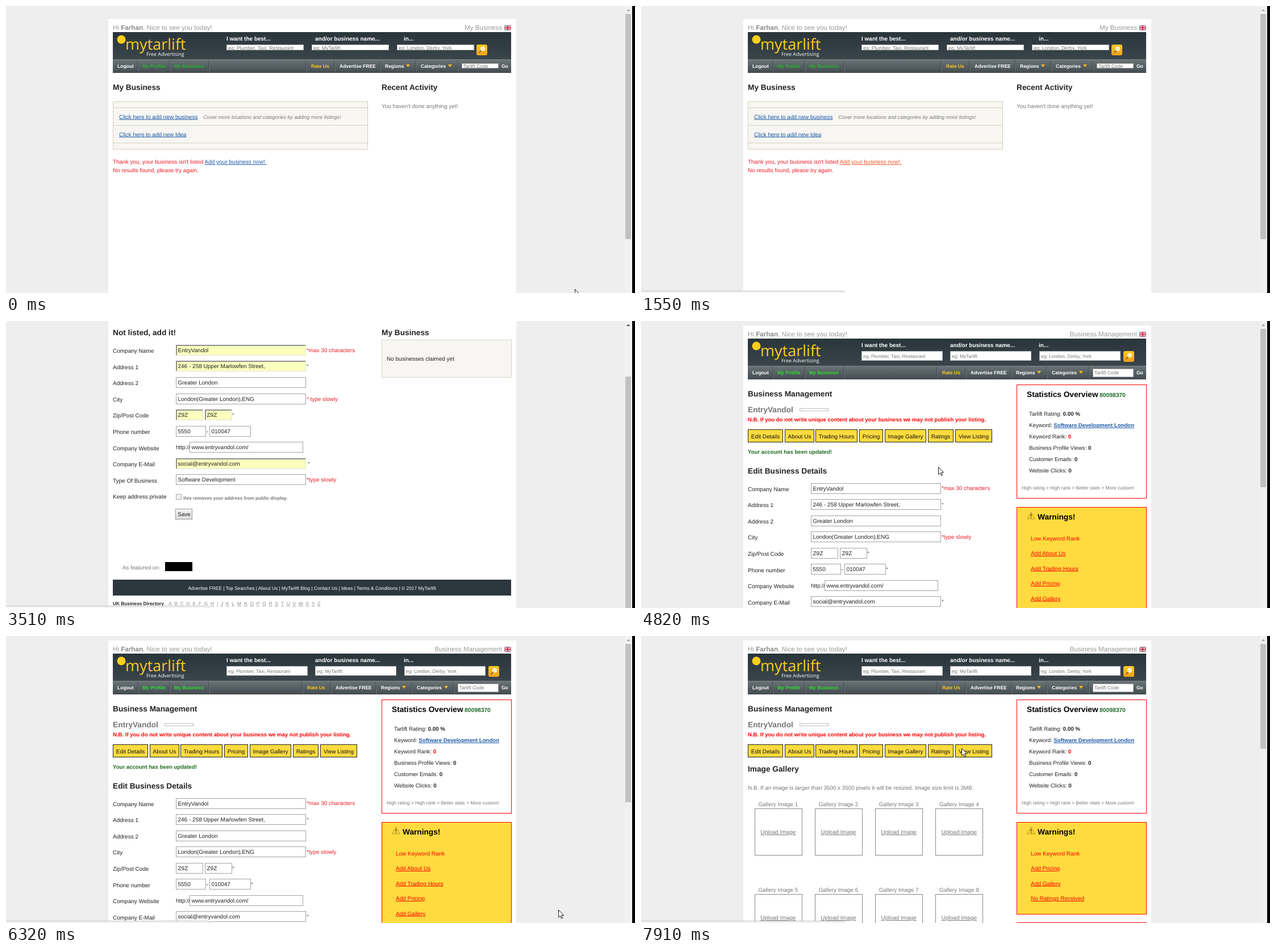
Write an HTML page that moves like this. It is 1107x506 px and loops after 8 s.

```html
<!DOCTYPE html>
<html lang="en">
<head>
<meta charset="utf-8">
<title>Business listing</title>
<style>
  html, body { margin: 0; width: 100%; height: 100%; overflow: hidden; background: #eee; }
  svg { display: block; width: 1107px; height: 506px; }
  text { font-family: "Liberation Sans", Arial, sans-serif; text-rendering: geometricPrecision; white-space: pre; }
  .logo { font-family: "Open Sans", "Noto Sans", sans-serif; }
  .b { font-weight: bold; }
  .i { font-style: italic; }
  .u { text-decoration: underline; }
  .mid { text-anchor: middle; }
</style>
</head>
<body>
<svg id="stage" viewBox="0 0 1107 506" xmlns="http://www.w3.org/2000/svg"></svg>
<script>
const LOOP = 8000;
const DARK = '#222', GREY = '#777', BLUE = '#1d5aa8', RED = '#ee1c25', ALERT = '#f00', GOLD = '#ffdb3f';
const BRAND = 'MyTarlift', COMPANY = 'EntryVandol';

// cy is the middle of the capital letters
const text = (x, cy, size, content, fill = DARK, cls = '') =>
  `<text x="${x}" y="${cy + size * .36}" font-size="${size}" fill="${fill}" class="${cls}">${content}</text>`;
const rect = (x, y, w, h, fill, extra = '') =>
  `<rect x="${x}" y="${y}" width="${w}" height="${h}" fill="${fill}" ${extra}/>`;
const box = (x, y, w, h, fill, stroke, extra = '') =>
  rect(x + .5, y + .5, w - 1, h - 1, fill, `stroke="${stroke}" ${extra}`);
const path = (d, fill, extra = '') => `<path d="${d}" fill="${fill}" ${extra}/>`;
const bold = (s, fill = DARK) => `<tspan class="b" fill="${fill}">${s}</tspan>`;
const heading = (x, cy, s, fill = DARK) => text(x, cy, 13.7, s, fill, 'b');

const gradient = (id, top, bottom) =>
  `<linearGradient id="${id}" x2="0" y2="1"><stop stop-color="${top}"/><stop offset="1" stop-color="${bottom}"/></linearGradient>`;
const defs = `<defs>${gradient('banner', '#2a353b', '#3a454b')}${gradient('nav', '#6b7477', '#424b4f')}` +
  `${gradient('find', '#fbc926', '#f0a01c')}${gradient('button', '#f5f5f5', '#dcdcdc')}</defs>`;

function flag(x, y) {
  return rect(x, y, 12, 9, '#2b3f86') +
    path(`M${x} ${y}l12 9m0-9l-12 9`, 'none', 'stroke="#fff" stroke-width="2"') +
    path(`M${x} ${y}l12 9m0-9l-12 9`, 'none', 'stroke="#d3283c" stroke-width=".7"') +
    path(`M${x + 6} ${y}v9m-6-4.5h12`, 'none', 'stroke="#fff" stroke-width="3.4"') +
    path(`M${x + 6} ${y}v9m-6-4.5h12`, 'none', 'stroke="#d3283c" stroke-width="2"');
}

// The top banner; the roomy version has taller search fields.
function header(title, roomy) {
  const fields = roomy ? [388, 544, 701] : [388, 538, 688];
  const [w, h, size] = roomy ? [143, 17, 8.35] : [136, 10, 8.8];
  const shift = roomy ? -7 : 0, green = roomy ? '#2be02b' : '#1fb52c';
  const hints = ['eg: Plumber, Taxi, Restaurant', 'eg: ' + BRAND, 'eg: London, Derby, York'];
  const bx = roomy ? 849 : 828;
  const codeY = roomy ? 99 : 101, codeH = roomy ? 15 : 9;
  let s = text(188, 38, 11.65, `Hi ${bold('Farhan', '#888')}, Nice to see you today!`, '#999') +
    `<g text-anchor="end">${text(873, 38, 11.65, title, '#999')}</g>` + flag(877, 34) +
    rect(188, 46, 701, 48, 'url(#banner)') + rect(188, 94, 701, 24, 'url(#nav)') +
    rect(188, 94, 701, 1, '#7d8588') +
    '<circle cx="203" cy="59" r="7.5" fill="#ffcf1a"/>' +
    text(210, 67.5, 27, BRAND.toLowerCase(), '#ffcf1a', 'logo') +
    text(247, 85, 8.9, 'Free Advertising', '#fff', 'logo');
  ['I want the best...', 'and/or business name...', 'in...'].forEach((label, i) =>
    s += text(388 + 156 * i, 57.5, 10, label, '#fff', 'b'));
  fields.forEach(x => s += box(x, 68, w, h, '#fff', '#b5b9bb'));
  s += '<g class="hint">' + hints.map((hint, i) =>
    text(fields[i] + 3, roomy ? 77 : 73.5, size, hint, GREY)).join('') + '</g>';
  s += rect(bx, 68, 19, 19, 'url(#find)', 'rx="3"') +
    `<circle cx="${bx + 11}" cy="75.5" r="3.6" fill="#fbe9b5" stroke="#fff"/>` +
    path(`M${bx + 8.5} 78.5l-4 4`, 'none', 'stroke="#8a6a3a" stroke-width="1.8"');
  [232, 288, 357].concat([528, 578, 658, 721, 795].map(x => x + shift)).forEach(x =>
    s += rect(x - .5, 95, 1, 23, '#3a4347') + rect(x + .5, 95, 1, 23, '#6c7578'));
  const item = (x, label, fill = '#fff') => text(x, 106, 8.5, label, fill, 'b');
  s += item(196, 'Logout') + item(240, 'My Profile', green) + item(296, 'My Business', green) +
    item(537 + shift, 'Rate Us', '#ffc91f') + item(587 + shift, 'Advertise FREE') +
    item(667 + shift, 'Regions') + item(730 + shift, 'Categories') + item(872, 'Go');
  [704, 778].forEach(x => s += path(`M${x + shift} 103h7l-3.5 5z`, '#f8b51e'));
  s += box(802 + shift, codeY, 65 - shift, codeH, '#fff', '#aaa') +
    text(805 + shift, 106, 8.6, 'Tarlift Code', GREY);
  return `<g transform="translate(0 ${roomy ? -15 : 0})">${s}</g>`;
}

function scrollbar(top, bottom, arrow = '#a3a3a3') {
  return rect(1089, 0, 13, 506, '#f1f1f1') + rect(1090, top, 10, bottom - top, '#c1c1c1') +
    path('M1092 9h6.5l-3.25-3.6z', arrow) + rect(1102, 0, 5, 506, '#000');
}
const sheet = top => rect(180, top, 718, 506 - top, '#fff');

function home() {
  let s = sheet(23) + header('My Business', false) + heading(188, 143, 'My Business') +
    heading(661, 143, 'Recent Activity') + text(661, 176, 9.9, "You haven't done anything yet!", GREY) +
    box(188, 168, 449, 85, '#f7f6f2', '#d5d1c0');
  [179, 210, 241].forEach(y => s += rect(188, y, 449, 1, '#d5d1c0'));
  return s + text(199, 195, 10, 'Click here to add new business', BLUE, 'u') +
    text(347.5, 195.5, 8.95, 'Cover more locations and categories by adding more listings!', GREY, 'i') +
    text(199, 226, 10, 'Click here to add new Idea', BLUE, 'u') +
    text(188, 274.5, 9.95, "Thank you, your business isn't listed", RED) +
    `<g id="link">${text(349.5, 274.5, 10, 'Add your business now!&#160;', 'currentColor', 'u')}</g>` +
    text(188, 289.5, 9.95, 'No results found, please try again.', RED) + scrollbar(14, 411);
}

// Listing form; unsaved required fields are yellow and sunken.
function form(y0, saved) {
  const rowY = i => y0 + 28.55 * i;
  const input = (i, x, w, value, required) => {
    const top = Math.round(rowY(i) - 10.4);
    const sunken = required && !saved;
    const frame = sunken
      ? rect(x, top, w, 19, '#e2e2da') + path(`M${x} ${top + 19}v-19h${w}l-2 2h${2 - w + 2}v15z`, '#8f8f8f') +
        rect(x + 2, top + 2, w - 3, 16, '#faffbd')
      : box(x, top, w, 19, '#fff', '#a3a3a3');
    return frame + text(x + 3.5, rowY(i) - 1, 10, value, DARK);
  };
  const note = (i, x, s, fill = RED) => text(x, rowY(i) - 1, 9.9, s, fill);
  const star = (i, x) => note(i, x, '*', '#664');
  const labels = ['Company Name', 'Address 1', 'Address 2', 'City', 'Zip/Post Code', 'Phone number',
    'Company Website', 'Company E-Mail', 'Type Of Business', 'Keep address private'];
  let s = labels.map((label, i) => text(188, rowY(i) + .3, 10, label)).join('') +
    input(0, 299, 229, COMPANY, true) + note(0, 529, '*max 30 characters') +
    input(1, 299, 229, '246 - 258 Upper Marlowfen Street,', true) + star(1, 529) +
    input(2, 299, 229, 'Greater London') +
    input(3, 299, 229, 'London(Greater London),ENG') + note(3, 529, saved ? '*type slowly' : '* type slowly') +
    input(4, 299, 48, 'Z9Z', true) + input(4, 350, 48, 'Z9Z', true) + star(4, 398) +
    input(5, 299, 53, '5550') + note(5, 352.5, '-', DARK) + input(5, 358, 73, '010047') +
    note(6, 299, 'http://', DARK) + input(6, 323, 200, 'www.entryvandol.com/') +
    input(7, 299, 229, 'social@entryvandol.com', true) + star(7, saved ? 529 : 531) +
    input(8, 299, 229, 'Software Development') + note(8, 529, '*type slowly');
  if (saved) s += star(5, 431);
  return s;
}

function addListing() {
  const letters = [...'ABCDEFGHIJKLMNOPQRSTUVWXYZ']
    .map((c, i) => `<tspan class="u" dx="${i ? 4.84 : 0}">${c}</tspan>`).join('');
  const footer = ['Advertise FREE', 'Top Searches', 'About Us', BRAND + ' Blog', 'Contact Us', 'Ideas',
    'Terms &amp; Conditions', '© 2017 ' + BRAND].join(' | ');
  return sheet(0) + heading(188, 20, 'Not listed, add it!') + heading(661, 20, 'My Business') +
    box(661, 33, 229, 67, '#f7f6f2', '#d8d5c8') + text(670, 66.3, 10, 'No businesses claimed yet') +
    form(52.3, false) + box(299, 305, 10, 10, '#f2f2f2', '#a0a0a0', 'rx="1.5"') +
    text(312, 312.3, 8.2, 'this removes your address from public display.', GREY, 'b') +
    box(298, 331, 30, 19, 'url(#button)', '#999') + text(302, 340, 10, 'Save') +
    text(205, 434, 9.8, 'As featured on:', GREY) + rect(280, 425, 48, 16, '#000') +
    rect(188, 456, 701, 28, '#2d383e') + text(538.5, 470.5, 8.35, footer, '#fff', 'mid') +
    text(188, 498.3, 8.3, 'UK Business Directory', DARK, 'b') + text(286, 498.3, 8.3, letters, '#888') +
    scrollbar(98, 506, '#505050');
}

function sidebar(tasks, closed) {
  const stats = ['Tarlift Rating: ' + bold('0.00 %'),
    'Keyword: ' + `<tspan class="b u" fill="${BLUE}" font-size="9.65">Software Development London</tspan>`,
    'Keyword Rank: ' + bold('0', ALERT), 'Business Profile Views: ' + bold('0'),
    'Customer Emails: ' + bold('0'), 'Website Clicks: ' + bold('0')];
  return box(661, 112, 229, 201, '#fff', ALERT) + heading(679, 129, 'Statistics Overview', '#000') +
    text(807, 130, 10.3, '80098370', '#1d6b2a', 'b') +
    stats.map((s, i) => text(683, 163.5 + 20 * i, 9.75, s)).join('') +
    text(670, 294, 8.4, 'High rating &gt; High rank &gt; Better stats &gt; More custom!', GREY) +
    box(661, 328, 229, closed ? 163 : 190, GOLD, ALERT) +
    (closed ? box(661, 505, 229, 20, '#fff', ALERT) : '') +
    path('M686.5 336.5l7 12.5h-14z', '#fbd12e', 'stroke="#b59a35" stroke-linejoin="round"') +
    path('M686.5 340v4.5m0 1.3v1.5', 'none', 'stroke="#333" stroke-width="1.3"') +
    heading(698, 345, 'Warnings!', '#000') + text(686, 383, 10, 'Low Keyword Rank', ALERT) +
    tasks.map((s, i) => text(686, 409.5 + 26.5 * i, 10, s, ALERT, 'u')).join('');
}

function manage(body, tasks, thumbEnd, closed) {
  const tabs = [[188, 62, 'Edit Details'], [253, 52, 'About Us'], [307, 74, 'Trading Hours'], [384, 42, 'Pricing'],
    [429, 73, 'Image Gallery'], [505, 45, 'Ratings'], [553, 65, 'View Listing']];
  return sheet(8) + header('Business Management', true) + heading(188, 128, 'Business Management') +
    heading(188, 156, COMPANY, GREY) + box(279, 154, 51, 5, '#fff', '#bbb') +
    text(188, 174, 9.55, 'N.B. If you do not write unique content about your business we may not publish your listing.', ALERT, 'b') +
    tabs.map(([x, w, s]) => box(x, 191, w, 23, GOLD, '#222') + text(x + w / 2, 203, 9.95, s, '#111', 'mid')).join('') +
    body + sidebar(tasks, closed) + scrollbar(14, thumbEnd);
}

function gallery() {
  let s = heading(188, 234, 'Image Gallery') +
    text(188, 267, 9.9, 'N.B. If an image is larger than 3500 x 3500 pixels it will be resized. Image size limit is 3MB.', GREY);
  for (let i = 0; i < 8; i++) {
    const cx = 241.3 + 106.2 * (i % 4), y = i < 4 ? 296.5 : 447.5;
    s += text(cx, y, 9.9, 'Gallery Image ' + (i + 1), GREY, 'mid') +
      box(Math.round(cx - 41.8), Math.ceil(y + 7), 84, 83, '#fff', '#888') +
      text(cx, y + 49, 10, 'Upload Image', GREY, 'mid u');
  }
  return s;
}

const editBody = text(188, 231, 9.6, 'Your account has been updated!', '#1c6b1c', 'b') +
  heading(188, 264.5, 'Edit Business Details') + form(295.9, true);
const todo = ['Add About Us', 'Add Trading Hours', 'Add Pricing', 'Add Gallery'];

const pages = [
  [0, 'home', home()],
  [2170, 'add', addListing()],
  [4820, 'edit', manage(editBody, todo, 293)],
  [6700, 'about', manage(heading(188, 234, 'About Us'), todo, 293)],
  [7410, 'gallery', manage(gallery(), ['Add Pricing', 'Add Gallery', 'No Ratings Received'], 199, true)]
];

const stage = document.getElementById('stage');
stage.innerHTML = defs + pages.map(([, id, s]) => `<g id="${id}">${s}</g>`).join('') +
  `<g id="status">${path('M-1 502.5H355q3 0 3 4V510H-1z', '#f2f2f2', 'stroke="#c4c4c4"')}</g>` +
  `<g id="cursor">${path('M.5 .5V13.6L3.5 10.8 5.6 15.6 7.6 14.7 5.5 10H9.6Z', '#fff', 'stroke="#111" stroke-width=".95"')}</g>`;
const el = id => document.getElementById(id);
const show = (node, on) => node.style.display = on ? '' : 'none';

// [start, end, steps, x0, y0, x1, y1]; [start, x, y] holds; [start] hides
const cursorTrack = [
  [-8, 540, 7, 1001, 499, 349, 276], [920, 1550, 8, 349, 276, 1020, 497], [1550],
  [2170, 2840, 9, 614, 404, 315, 333], [3020], [3220, 370, 349], [3510],
  [4820, 5600, 10, 523, 257, 288, 202], [5650, 272, 199], [5820, 447, 248], [6130, 946, 454],
  [6280, 960, 470], [6320, 972, 482.5], [6490, 973, 484], [6550],
  [6700, 1012, 490], [6870], [7410, 7910, 7, 720, 420, 564, 197.5]
];
const ease = p => p * p * (3 - 2 * p);
const within = (t, a, b) => t >= a && t < b;

function cursorAt(t) {
  const key = cursorTrack.filter(k => k[0] <= t).pop();
  if (key.length === 1) return null;
  if (key.length === 3) return key.slice(1);
  const [start, end, steps, x0, y0, x1, y1] = key;
  const p = ease(Math.min(1, Math.floor((t - start) / (end - start) * steps) / steps));
  return [x0 + (x1 - x0) * p, y0 + (y1 - y0) * p];
}

function render(t) {
  const current = pages.filter(([start]) => start <= t).pop()[1];
  pages.forEach(([, id]) => show(el(id), id === current));
  show(el('about').querySelector('.hint'), t >= 7210);
  el('link').style.color = t >= 920 ? '#f0562a' : BLUE;
  show(el('status'), within(t, 730, 2170) || within(t, 3220, 4820) || t >= 5820);
  const pos = cursorAt(t);
  show(el('cursor'), pos);
  if (pos) el('cursor').setAttribute('transform', `translate(${pos})`);
}

const begin = performance.now();
function tick() {
  render((performance.now() - begin) % LOOP);
  requestAnimationFrame(tick);
}
tick();
</script>
</body>
</html>
```
